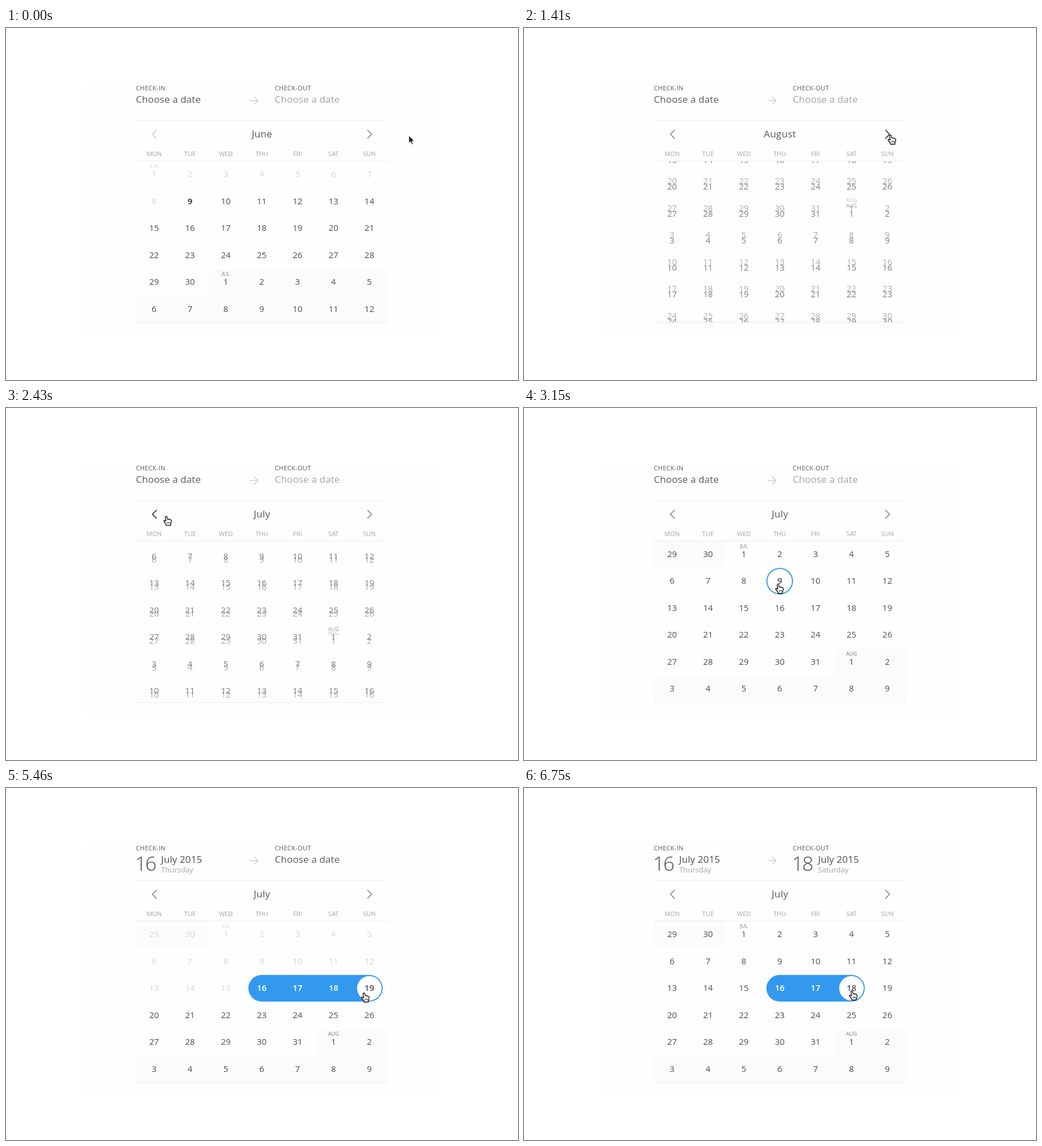
An HTML page with a canvas for the animation above (8750 ms loop, 901x621 px).

```html
<!DOCTYPE html>
<html lang="en">
<head>
<meta charset="utf-8">
<title>Date range picker</title>
<style>
html, body { margin: 0; width: 100%; height: 100%; overflow: hidden; background: #fff; }
canvas { display: block; }
</style>
</head>
<body>
<canvas id="stage" width="901" height="621"></canvas>
<script>
const ctx = document.getElementById('stage').getContext('2d');
const LOOP = 8750, STEP = 30;
const LEFT = 229, RIGHT = 672, TOP = 235, BOTTOM = 519;
const COL = 63.13, CELL = (RIGHT - LEFT) / 7, ROW = 47.5, FIRST_X = 260.6, FIRST_Y = 258;
const PANEL = '#fefdff', SHADE = '#fbfafc', LINE = '#ededf0', BLUE = '#3399ee';
const DARK = '#4d4d51', GREY = '#a6a6aa', PALE = '#d6d6d9';
const MONTHS = ['June', 'July', 'August'];
const LABELS = ['JUN', 'JUL', 'AUG', 'SEP'];
const WEEK = ['MON', 'TUE', 'WED', 'THU', 'FRI', 'SAT', 'SUN'];
const TODAY = 8, CHECK_IN = 45, CHECK_OUT = 47;
const PICK_IN = 4080, PICK_OUT = 6750;

// time of the click, direction, month shown before and after
const TURNS = [
  { at: 673, dir: 1, from: 0, to: 1 },
  { at: 1260, dir: 1, from: 1, to: 2 },
  { at: 2215, dir: -1, from: 2, to: 1 }
];

const POINTER = [
  [0, 709, 190], [390, 645, 188.5], [1560, 645, 188.5], [1980, 281, 190],
  [2400, 281, 190], [3060, 447, 290], [3420, 448, 421], [3810, 448, 357],
  [4320, 448, 357], [5220, 606, 360], [5460, 630, 361], [5580, 632, 364],
  [5760, 628, 400], [5950, 520, 404], [6150, 580, 395], [6510, 577, 357.5]
];

const ARROW = new Path2D('M0 0V13L3 10.2L5 15L7.2 14L5.2 9.4H9.4Z');
const HAND = new Path2D('M-1.7 1.5Q-.3-.6 1.2 1.2L2 5.5Q3.5 4.6 4.6 6Q6 5.2 7 6.7' +
  'Q9 6.3 9.2 8.2Q9.2 11.5 7.7 13.5V16.5H-.2V14.5L-3.6 10Q-5 8-3.6 7.6Q-2.2 7.5-.6 9.2Z');
const KNUCKLES = new Path2D('M2.2 10.5v3M4.2 10.5v3M6.2 10.5v3');

const clamp = v => Math.max(0, Math.min(1, v));
const smooth = p => p * p * (3 - 2 * p);
const colX = c => FIRST_X + c * COL;

const days = Array.from({ length: 7 * 16 }, (_, n) => {
  const date = new Date(Date.UTC(2015, 5, 1 + n));
  return { n, col: n % 7, row: Math.floor(n / 7), month: date.getUTCMonth() - 5, num: date.getUTCDate() };
});

function scrollAt(t) {
  return TURNS.reduce((sum, k) =>
    t > k.at ? sum + k.dir * 4 * ROW * (1 - Math.exp(-0.0068 * (t - k.at))) : sum, 0);
}

function pointerAt(t) {
  const i = POINTER.findIndex(k => k[0] > t);
  if (i < 0) return POINTER[POINTER.length - 1].slice(1);
  const a = POINTER[i - 1], b = POINTER[i];
  const p = smooth((t - a[0]) / (b[0] - a[0]));
  return [a[1] + (b[1] - a[1]) * p, a[2] + (b[2] - a[2]) * p];
}

function text(str, x, y, size, color, { weight = 400, align = 'left', spacing = 0 } = {}) {
  ctx.font = `${weight} ${size}px "Open Sans", "Noto Sans", sans-serif`;
  ctx.letterSpacing = spacing + 'px';
  ctx.textAlign = align;
  ctx.fillStyle = color;
  ctx.fillText(str, x, y);
}

function stroke(points, color, width) {
  ctx.beginPath();
  points.forEach(([x, y]) => ctx.lineTo(x, y));
  ctx.strokeStyle = color;
  ctx.lineWidth = width;
  ctx.stroke();
}

function disc(x, y, r, color) {
  ctx.beginPath();
  ctx.arc(x, y, r, 0, Math.PI * 2);
  ctx.fillStyle = color;
  ctx.fill();
}

function chevron(x, dir, color) {
  stroke([[x - dir * 3.7, 180], [x + dir * 3.7, 187.5], [x - dir * 3.7, 195]], color, 1.8);
}

function chosenDate(x, num, weekday) {
  text(num, x - 2, 146, 35, DARK, { weight: 300, spacing: -2 });
  text('July 2015', x + 44, 132, 17, DARK, { spacing: 0.1 });
  text(weekday, x + 44, 148.5, 13, GREY);
}

function header(t) {
  const picked = t >= PICK_IN;
  const prompt = (x, color) => text('Choose a date', x, 132, 17, color, { spacing: 0.1 });
  text('CHECK-IN', 228.5, 109.5, 11, '#5a5a5e', { spacing: 0.3 });
  text('CHECK-OUT', 473, 109.5, 11, '#5a5a5e', { spacing: 0.3 });
  if (picked) chosenDate(229, '16', 'Thursday');
  else prompt(228.5, '#5c5c60');
  if (t >= PICK_OUT) chosenDate(473.5, '18', 'Saturday');
  else prompt(473, picked ? '#5c5c60' : GREY);
  stroke([[428.5, 128], [443, 128]], '#cfcfd3', 1.5);
  stroke([[436.5, 121], [443.5, 128], [436.5, 135]], '#cfcfd3', 1.5);
}

function shadeMonth(month, alpha, scroll) {
  if (alpha <= 0) return;
  const cell = (d, grow) => ctx.fillRect(LEFT + d.col * CELL - grow,
    FIRST_Y + d.row * ROW - scroll - ROW / 2 - grow, CELL + 2 * grow, ROW + 2 * grow);
  ctx.globalAlpha = alpha;
  ctx.fillStyle = SHADE;
  ctx.fillRect(LEFT, TOP, RIGHT - LEFT, BOTTOM - TOP);
  ctx.globalAlpha = 1;
  ctx.fillStyle = PANEL;
  days.filter(d => d.month === month).forEach(d => cell(d, 2));
}

function rangePill(end, scroll) {
  const a = days[CHECK_IN], b = days[end];
  ctx.fillStyle = BLUE;
  for (let row = a.row; row <= b.row; row++) {
    const opens = row === a.row, closes = row === b.row;
    const x1 = opens ? colX(a.col) - 23.5 : LEFT - 1;
    const x2 = closes ? colX(b.col) + 23.5 : RIGHT;
    const l = opens ? 23.5 : 0, r = closes ? 23.5 : 0;
    ctx.beginPath();
    ctx.roundRect(x1, FIRST_Y + row * ROW - scroll - 23.2, x2 - x1, 47, [l, r, r, l]);
    ctx.fill();
  }
}

function drawDays(scroll, alpha, min, hover, end) {
  ctx.globalAlpha = alpha;
  for (const d of days) {
    const y = FIRST_Y + d.row * ROW - scroll;
    if (y < TOP - 20 || y > BOTTOM + 20) continue;
    const inRange = end >= 0 && d.n >= CHECK_IN && d.n <= end;
    const open = inRange && (d.n < end || d.n === CHECK_IN);
    const off = d.n < min;
    const color = open ? '#fff' : off ? PALE : DARK;
    const weight = d.n === TODAY ? 700 : inRange || d.n === hover ? 600 : 500;
    text(d.num, colX(d.col), y + 5.2, 15, color, { weight: off ? 400 : weight, align: 'center' });
    if (d.num === 1) {
      text(LABELS[d.month], colX(d.col), y - 10.7, 9, off ? PALE : '#77777b',
        { align: 'center', spacing: 0.1 });
    }
  }
  ctx.globalAlpha = 1;
}

function calendar(t, turn, hover, min) {
  const scroll = scrollAt(t), next = scrollAt(t + 22.7);
  const end = t >= PICK_OUT ? CHECK_OUT : t >= PICK_IN ? Math.max(hover, CHECK_IN) : -1;
  ctx.save();
  ctx.beginPath();
  ctx.rect(LEFT - 1, TOP, RIGHT - LEFT + 1, BOTTOM - TOP);
  ctx.clip();

  const age = turn ? t - turn.at : Infinity;
  if (turn) shadeMonth(turn.from, clamp(1 - age / 120), scroll);
  shadeMonth(turn ? turn.to : 0, clamp((age - 225) / 60), scroll);

  const tip = end >= 0 ? end : hover;
  if (end >= 0) rangePill(end, scroll);
  if (tip >= 0 && end !== CHECK_IN) {
    const d = days[tip], x = colX(d.col), y = FIRST_Y + d.row * ROW - scroll + 0.3;
    if (end < 0) disc(x, y, 23.5, BLUE);
    disc(x, y, 21.6, '#fff');
  }

  // fast scrolling shows two blended positions
  if (Math.abs(next - scroll) > 0.7) {
    drawDays(scroll, 0.72, min, hover, end);
    drawDays(next, 0.46, min, hover, end);
  } else {
    drawDays(scroll, 1, min, hover, end);
  }
  ctx.restore();
}

function dayUnder(x, y, t, min) {
  if (x < LEFT || x >= RIGHT || y < TOP || y > BOTTOM) return -1;
  const row = Math.floor((y + scrollAt(t) - FIRST_Y + ROW / 2) / ROW);
  const n = row * 7 + Math.floor((x - LEFT) / CELL);
  return n >= min ? n : -1;
}

function drawPointer(x, y, hand) {
  ctx.save();
  ctx.translate(x, y);
  ctx.lineJoin = 'round';
  ctx.shadowColor = 'rgba(0,0,0,.3)';
  ctx.shadowBlur = 2;
  ctx.shadowOffsetY = 1;
  ctx.fillStyle = hand ? '#fff' : '#111';
  ctx.fill(hand ? HAND : ARROW);
  ctx.shadowColor = 'transparent';
  ctx.strokeStyle = hand ? '#1a1a1a' : '#fff';
  ctx.lineWidth = hand ? 1.4 : 0.9;
  ctx.stroke(hand ? HAND : ARROW);
  if (hand) {
    ctx.lineWidth = 0.9;
    ctx.stroke(KNUCKLES);
  }
  ctx.restore();
}

function draw(t) {
  const turn = TURNS.filter(k => t > k.at).pop();
  const month = turn ? turn.to : 0;
  const min = t >= PICK_IN && t < PICK_OUT ? CHECK_IN : TODAY;
  const [x, y] = pointerAt(t);
  const hover = dayUnder(x, y, t, min);
  const onButton = bx => Math.abs(x - bx) < 24 && y > 168 && y < 208;
  const onPrev = onButton(261) && month > 0, onNext = onButton(640);

  ctx.fillStyle = '#fff';
  ctx.fillRect(0, 0, 901, 621);
  ctx.fillStyle = PANEL;
  ctx.fillRect(141, 98, 622, 446);

  header(t);
  chevron(261.3, -1, month === 0 ? '#d0d0d4' : onPrev ? '#48484c' : '#98989c');
  chevron(639.7, 1, onNext ? '#48484c' : '#98989c');
  text(MONTHS[month], 450.5, 193, 17, '#57575b', { align: 'center', spacing: 0.3 });
  WEEK.forEach((name, i) => text(name, colX(i), 226, 11, GREY, { align: 'center' }));

  calendar(t, turn, hover, min);
  [163.5, 234.5, 519.5].forEach(ly => stroke([[LEFT, ly], [RIGHT, ly]], LINE, 1));

  const onSelected = t >= PICK_IN && hover === CHECK_IN;
  drawPointer(x, y, onPrev || onNext || (hover >= 0 && !onSelected));
}

let start;
function tick(now) {
  start ??= now;
  draw(Math.floor(((now - start) % LOOP) / STEP) * STEP);
  requestAnimationFrame(tick);
}
draw(0);
requestAnimationFrame(tick);
</script>
</body>
</html>
```
